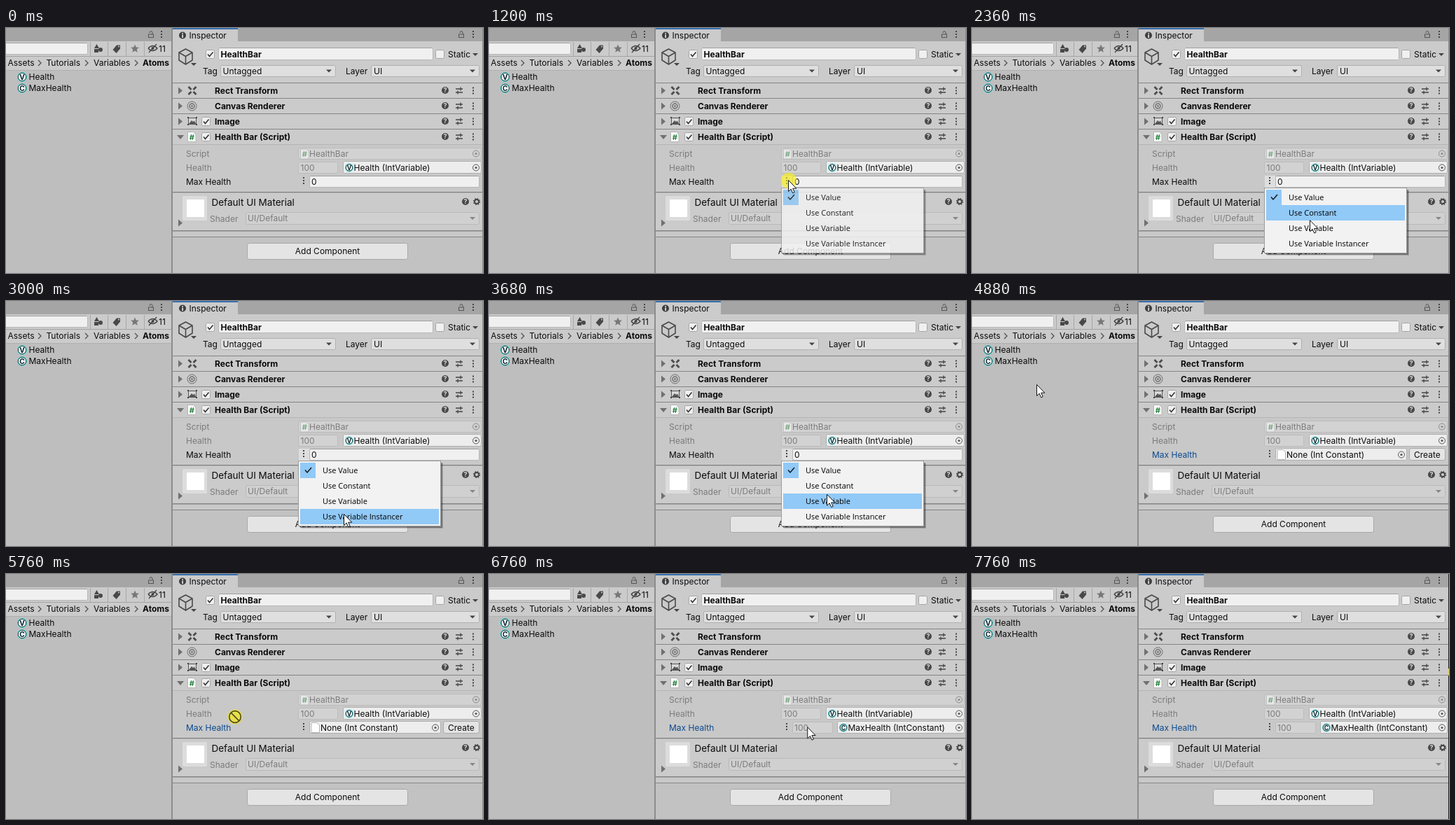
These frames come from a looping animation (681x350 px, 7840 ms). An HTML page:

```html
<!DOCTYPE html>
<html lang="en">
<head>
<meta charset="utf-8">
<title>Inspector</title>
<style>
html, body { margin: 0; width: 100%; height: 100%; overflow: hidden; background: #c8c8c8; }
svg { display: block; }
text { font: 12px Inter, sans-serif; fill: #0b0b0b; white-space: pre; }
.b { font-weight: 700; }
.dim { fill: #7b7b7b; }
.menu text { font: 11px "Open Sans", sans-serif; fill: #000; }
</style>
</head>
<body>
<svg id="stage" width="681" height="350" viewBox="0 0 681 350"></svg>
<script>
const LOOP = 7840, STEP = 40;

// --- drawing helpers, each returns markup ---
const rect = (x, y, w, h, fill, more = '') =>
  `<rect x="${x}" y="${y}" width="${w}" height="${h}" fill="${fill}" ${more}/>`;
const box = (x, y, w, h, fill, line, r = 2) =>
  rect(x + .5, y + .5, w - 1, h - 1, fill, `stroke="${line}" rx="${r}"`);
const path = (d, fill, more = '') => `<path d="${d}" fill="${fill}" ${more}/>`;
const line = (d, color = '#444', w = 1) => path(d, 'none', `stroke="${color}" stroke-width="${w}"`);
const circle = (x, y, r, fill, more = '') =>
  `<circle cx="${x}" cy="${y}" r="${r}" fill="${fill}" ${more}/>`;
const text = (x, y, s, cls = '', style = '') =>
  `<text x="${x}" y="${y}" class="${cls}" style="${style}">${s}</text>`;
const group = (x, y, s, more = '') => `<g transform="translate(${x} ${y})" ${more}>${s}</g>`;

const field = (x, y, w, h) => box(x, y, w, h, '#f0f0f0', '#b7b7b7') + rect(x + 2, y, w - 4, 1, '#a0a0a0');
const objField = (x, y, w) => box(x, y, w, 18, '#ededed', '#b0b0b0');
const offField = (x, y, w, h) => box(x, y, w, h, '#d2d2d2', '#bcbcbc');
const down = (x, y, c = '#444') => path(`M${x - 4} ${y - 2}h8l-4 4z`, c);
const drop = (x, y, w, h) => box(x, y, w, h, '#dfdfdf', '#b0b0b0') + down(x + w - 10, y + h / 2);
const right = (x, y) => path(`M${x - 3} ${y - 5}v10l6-5z`, '#707070');
const dots = (x, y, c = '#444') => [-4, 0, 4].map(d => rect(x - 1, y + d - 1, 2, 2, c)).join('');
const target = (x, y, c = '#555') => circle(x, y, 4.5, 'none', `stroke="${c}"`) + circle(x, y, 1.6, c);
const check = (x, y, on) => box(x, y, 13, 13, '#f0f0f0', '#a5a5a5') +
  (on ? line(`M${x + 3} ${y + 6.5}l2.5 3l5-6`, '#333', 1.6) : '');
const lock = (x, y) => rect(x - 3.5, y, 7, 4.5, 'none', 'stroke="#555"') +
  line(`M${x - 2} ${y - 2}q0-2.500 2-2.500t2 2.500v2`, '#555');
const help = (x, y) => circle(x, y, 5, '#484848') +
  text(x, y + 3.3, '?', 'b', 'font-size:9px;fill:#e0e0e0;text-anchor:middle');
const sliders = (x, y) =>
  line(`M${x - 5} ${y - 2.5}h10M${x - 5} ${y + 2.5}h10M${x + 2} ${y - 5}v5M${x - 2} ${y}v5`, '#444', 1.3);
const page = (x, y, mark) =>
  path(`M${x - 5.5} ${y - 7}h8l3.500 3.500v10.500h-11.500z`, '#fff', 'stroke="#b4b4b4"') +
  (mark ? text(x + .2, y + 4.3, '#', 'b', 'font-size:11px;fill:#24803c;text-anchor:middle') : '');
const badge = (x, y, letter, r = 7) =>
  circle(x, y, r, '#58d6d6') +
  circle(x, y, r - 1.3, '#f2fcfc', 'stroke="#1d3a42"') +
  text(x, y + r * .52, letter, 'b', `font-size:${r * 1.45}px;fill:#0d2329;text-anchor:middle`);

function projectPanel() {
  const sep = [120, 145, 171, 197].map(x => rect(x, 20, 1, 20, '#a8a8a8')).join('');
  const chevrons = [46, 113, 184].map(x => line(`M${x} 46l4 4l-4 4`, '#555', 1.4)).join('');
  return rect(0, 0, 236, 350, '#bebebe') + rect(0, 0, 236, 19, '#a5a5a5') +
    rect(0, 19, 236, 41, '#cbcbcb') + rect(0, 40, 236, 1, '#a3a3a3') + rect(0, 60, 236, 1, '#b0b0b0') +
    lock(207, 9) + dots(222, 9) + field(-9, 21, 126, 17) + sep +
    path('M129.500 23l3.500 6h-7zM126 30h6v5h-6z', '#484848') + circle(135, 31, 3, '#484848') +
    path('M152.500 31l5.500-6.500h5v5l-5.500 6.500z', '#484848') + circle(161, 26.500, 1, '#cbcbcb') +
    path('M184 23.500l1.700 3.900 4.200.4-3.200 2.800 1 4.200-3.700-2.200-3.700 2.200 1-4.200-3.200-2.800 4.200-.4z', '#777') +
    line('M203 29q6.500-7 13 0q-6.500 7-13 0M204 35l11-12', '#444', 1.4) + circle(209.500, 29, 2, '#444') +
    text(218, 34, '11') + text(2.500, 54, 'Assets') + text(57.500, 54, 'Tutorials') +
    text(125, 54, 'Variables') + text(195, 54, 'Atoms', 'b') + chevrons +
    badge(23, 70, 'V') + text(32.500, 74, 'Health') + badge(23, 86, 'C') + text(32.500, 90, 'MaxHealth') +
    rect(236, 0, 2, 350, '#8c8c8c');
}

function header() {
  return rect(238, 0, 442, 350, '#c8c8c8') + rect(238, 0, 442, 19, '#a5a5a5') +
    rect(238, 0, 93, 20, '#cbcbcb') + rect(238, 0, 93, 2, '#3a72b0') +
    rect(238, 19, 442, 59, '#cbcbcb') +
    circle(252, 10.500, 5, '#3f3f3f') + rect(251.300, 7, 1.600, 1.600, '#eee') + rect(251.300, 9.500, 1.600, 4.500, '#eee') +
    text(261.500, 15, 'Inspector') + lock(650, 9) + dots(667, 9) +
    line('M256.500 30l9.500 5v11l-9.500 6l-9.500-6v-11zM247 35l9.500 5.500l9.500-5.500M256.500 40.500v11', '#4a4a4a', 1.600) +
    down(268, 52) + check(285, 31, true) + field(303, 28, 307, 18) + text(306.500, 41.500, 'HealthBar', 'b') +
    check(613, 31, false) + text(631, 41.500, 'Static') + down(670, 38) +
    text(281, 66, 'Tag') + drop(306, 53, 165, 17) + text(309.500, 66, 'Untagged') +
    text(485, 66, 'Layer') + drop(521, 53, 155, 17) + text(525, 66, 'UI');
}

function components() {
  const bar = (y, name, icon, open) => rect(238, y, 442, 1, '#858585') + rect(238, y + 1, 442, 21, '#cbcbcb') +
    (open ? path(`M244 ${y + 9}h10l-5 6z`, '#707070') : right(249, y + 11.500)) + icon +
    text(298, y + 16, name, 'b') + help(627, y + 11) + sliders(647, y + 11.500) + dots(667, y + 11.500);
  const corners = line('M260.500 84l4 4M271.500 84l-4 4M260.500 95l4-4M271.500 95l-4-4', '#4c4c4c', 2.800);
  const ring = circle(265.500, 111.500, 6.500, 'none', 'stroke="#707070"') +
    circle(265.500, 111.500, 3.500, 'none', 'stroke="#707070" stroke-width="1.500"') + circle(265.500, 111.500, 1.300, '#666');
  const picture = rect(260.500, 128.500, 11, 9, '#d8d8d8', 'stroke="#555"') + path('M261 137l4-5l2 2l2-1.500l2 4.500z', '#555') +
    [[259, 127], [271, 127], [259, 137], [271, 137]].map(([x, y]) => rect(x, y, 2, 2, '#444')).join('');
  return bar(78, 'Rect Transform', corners) + bar(100, 'Canvas Renderer', ring) +
    bar(122, 'Image', picture + check(279, 127, true)) +
    bar(144, 'Health Bar (Script)', page(265, 155.500, true) + check(279, 149, true), true) +
    rect(238, 166, 442, 1, '#b4b4b4') +
    text(257, 184, 'Script', 'dim') + offField(417, 171, 262, 17) +
    group(426, 180, page(0, 0, true), 'opacity=".5" ') + text(433, 184, 'HealthBar', 'dim') + target(671, 179.500, '#8a8a8a') +
    text(257, 204, 'Health', 'dim') + offField(417, 191, 57, 17) + text(420.500, 204, '100', 'dim') +
    objField(481, 190, 198) + badge(490, 199.500, 'V', 6) + text(496.500, 204, 'Health (IntVariable)') + target(671, 199.500);
}

function material() {
  return rect(238, 234, 442, 1.500, '#7f7f7f') + rect(238, 235.500, 442, 53, '#cbcbcb') +
    rect(252, 240, 35, 35, '#dcdcdc', 'rx="2"') + rect(258, 245, 25, 25, '#fff') +
    text(293.500, 254, 'Default UI Material', '', 'font-size:13.500px') + help(656, 248) +
    circle(672, 248, 3, 'none', 'stroke="#444" stroke-width="1.800"') +
    circle(672, 248, 4.400, 'none', 'stroke="#444" stroke-width="1.400" stroke-dasharray="1.700 1.756"') +
    text(291, 277, 'Shader', 'dim') + box(342, 263, 334, 18, '#d0d0d0', '#bababa') +
    text(345, 276, 'UI/Default', 'dim') + down(666, 272, '#858585') + right(249, 278.500) +
    rect(238, 289, 442, 1.500, '#858585') + rect(238, 298, 442, 1, '#858585') + rect(238, 299, 442, 51, '#c2c2c2') +
    box(344, 307, 230, 24, '#e4e4e4', '#a8a8a8', 3) + text(459, 323, 'Add Component', '', 'text-anchor:middle') +
    rect(680, 0, 1, 350, '#8c8c8c');
}

// --- the changing row ---
const OPEN = 1160, PICK = 4160, DROPPED = 6160;

function maxHealth(t, x) {
  if (t < PICK) {
    const hover = t >= 800;
    return text(257, 224, 'Max Health') + (hover ? rect(418, 211, 15, 17, '#dedede') : '') +
      dots(425, 218) + field(433, 211, 243, 17) + text(436, 224, '0');
  }
  const label = text(257, 224, 'Max Health', '', 'fill:#0b4a8f') + dots(425, 218);
  if (t < DROPPED) {
    const over = t > 5400 && x > 433;
    return label + objField(433, 210, 188) +
      (over ? rect(433.500, 210.500, 184, 17, 'none', 'stroke="#3a72b0" rx="2"') : '') +
      page(441.500, 219.500) + text(449, 224, 'None (Int Constant)') +
      target(613, 219.500) + box(624, 210, 52, 18, '#e4e4e4', '#a8a8a8', 3) + text(631, 224, 'Create');
  }
  return label + offField(433, 211, 58, 17) + text(436, 224, '100', 'dim') + objField(497, 210, 182) +
    badge(506, 219.500, 'C', 6) + text(512.500, 224, 'MaxHealth (IntConstant)') + target(671, 219.500);
}

function menu(t, y) {
  if (t < OPEN || t >= PICK) return '';
  const alpha = Math.min(1, (t - OPEN + 40) / 95);
  const hot = y >= 231 ? Math.floor((y - 231) / 22) : -1;
  const rows = ['Use Value', 'Use Constant', 'Use Variable', 'Use Variable Instancer'];
  return `<g class="menu" opacity="${alpha}">` +
    rect(421, 232, 203, 93, '#000', 'opacity=".16"') + rect(420, 231, 203, 93, '#000', 'opacity=".3"') +
    rect(417.500, 228.500, 203, 93, '#f2f2f2', 'stroke="#9c9c9c"') + rect(420, 231, 22, 22, '#91c9f7') +
    (hot >= 0 ? rect(420, 231 + hot * 22, 198, 22, '#91c9f7') : '') +
    line('M427 241.500l3 3.500l6-7', '#111', 1.400) +
    rows.map((s, i) => text(452, 246 + i * 22, s)).join('') + '</g>';
}

// --- pointer ---
const ease = {
  hold: () => 0,
  lin: u => u,
  soft: u => u * u * (3 - 2 * u),
  out: u => 1 - (1 - u) * (1 - u),
  in: u => Math.pow(u, 1.3)
};
// time, x, y, easing towards the next stop
const stops = [
  [200, 521, 352, 'soft'], [880, 427, 217, 'hold'],
  [1440, 427, 217, 'soft'], [2240, 482, 264, 'soft'],
  [2520, 482, 290, 'hold'], [2720, 482, 290, 'soft'],
  [3000, 482, 304, 'hold'], [3200, 482, 304, 'soft'],
  [3360, 482, 290, 'hold'], [3520, 482, 290, 'soft'],
  [3820, 482, 264, 'hold'], [4200, 482, 264, 'in'],
  [4840, 110, 131, 'lin'], [4880, 92, 119, 'out'],
  [5120, 74, 87, 'hold'], [5360, 74, 87, 'in'],
  [5760, 327, 204, 'out'], [6080, 454, 217, 'hold'],
  [6720, 454, 217, 'soft'], [7400, 480, 352, 'hold']
];

function pointerAt(t) {
  let i = 0;
  while (i < stops.length - 2 && t >= stops[i + 1][0]) i++;
  const [t0, x0, y0, kind] = stops[i], [t1, x1, y1] = stops[i + 1];
  const k = ease[kind](Math.max(0, Math.min(1, (t - t0) / (t1 - t0))));
  return { x: x0 + (x1 - x0) * k, y: y0 + (y1 - y0) * k };
}

const ARROW = path('M.5 .5v16l3.700-3.400l2.500 5.700l2.500-1.100l-2.500-5.500h5.100z', '#fff', 'stroke="#111"');
const LINK = ARROW + rect(10.500, 22.500, 14, 11, '#fff', 'stroke="#333"') + line('M13 30q1-4 7-4m-3-2.500l3 2.500l-3 2.500', '#333');
const FORBID = circle(0, 0, 8.300, 'none', 'stroke="#57501c" stroke-width="1.700"') + line('M-5.800 -5.800l11.600 11.600', '#57501c', 1.700);

function pointer(t, { x, y }) {
  if (t < 240 || t >= 7360) return '';
  const dragging = t >= 5400 && t < DROPPED;
  const blocked = dragging && x < 433;
  const glow = (r, d = 1) => circle(d, d, r, '#fbf000', 'opacity=".6"');
  let s = '';
  for (const t0 of [1120, 4080]) {
    if (t >= t0 && t < t0 + 120) s = glow(12.500 - (t - t0) / 60);
  }
  if (t >= 5360 && t < DROPPED) s = glow(10.500, blocked ? 0 : 1);
  return group(x, y, s + (blocked ? FORBID : dragging ? LINK : ARROW));
}

const stage = document.getElementById('stage');
stage.innerHTML = projectPanel() + header() + components() + material() + '<g id="live"></g>';
const live = document.getElementById('live');
let shown = -1;

function draw(ms) {
  const t = Math.floor((ms % LOOP) / STEP) * STEP;
  if (t !== shown) {
    shown = t;
    const p = pointerAt(t);
    live.innerHTML = maxHealth(t, p.x) + menu(t, p.y) + pointer(t, p) +
      (t >= 7760 ? rect(680, 0, 1, 350, '#222') + rect(680, 135, 1, 10, '#d8d46a') : '');
  }
}

const start = performance.now();
function tick() {
  draw(performance.now() - start);
  requestAnimationFrame(tick);
}
tick();
</script>
</body>
</html>
```
